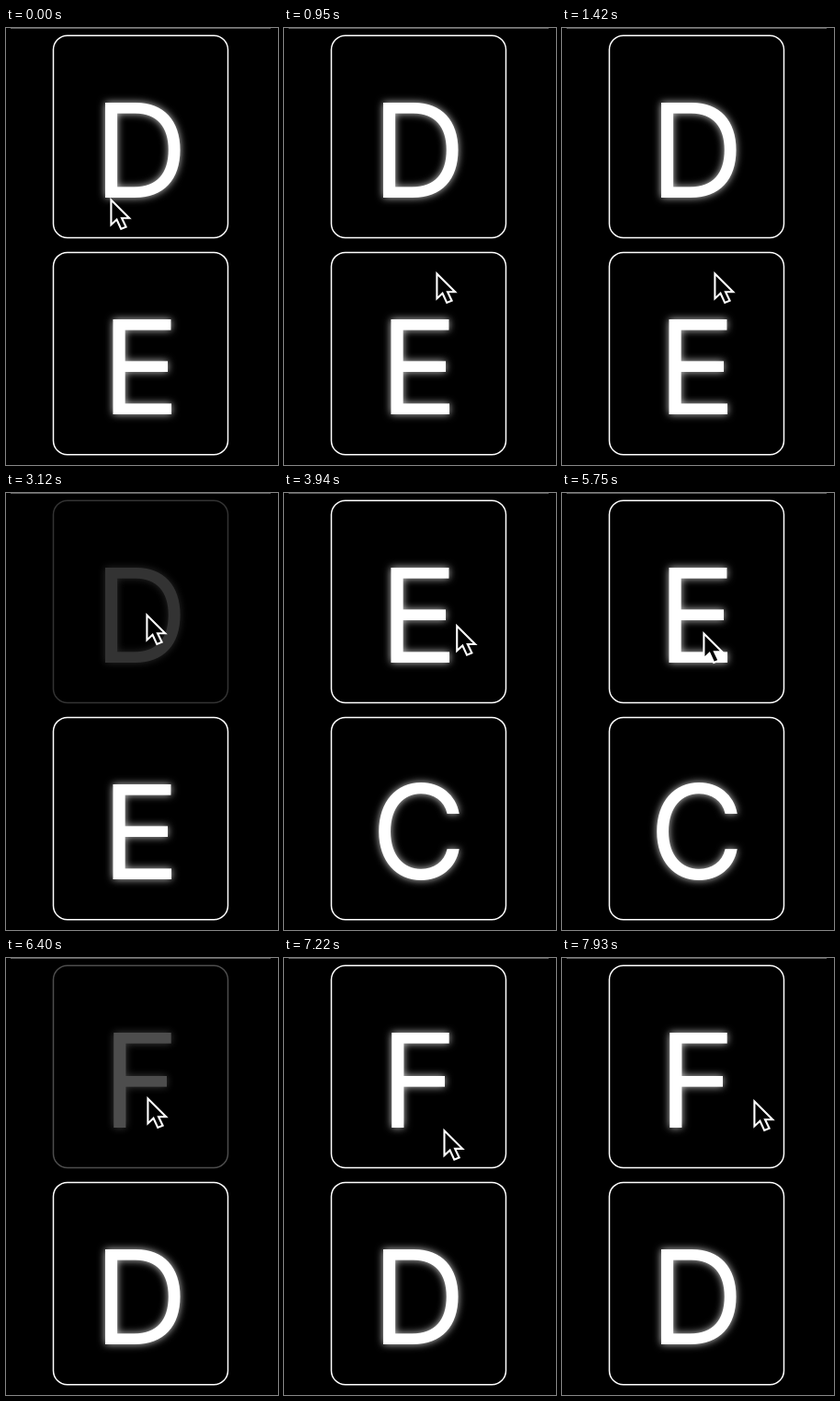
An HTML page that plays this animation: 296x474 px, repeating every 8000 ms.

```html
<!DOCTYPE html>
<html lang="en">
<head>
<meta charset="utf-8">
<style>
  html, body { margin: 0; height: 100%; overflow: hidden; background: #000; }
  svg { display: block; width: 296px; height: 474px; }
  rect { fill: none; stroke: #fff; stroke-width: 1.5; }
  text {
    font: 400 142px Inter, Roboto, sans-serif;
    fill: #fff;
    text-anchor: middle;
    filter: drop-shadow(0 0 4px #fffc);
  }
</style>
</head>
<body>
<svg viewBox="0 0 296 474">
  <path d="M5 .5H288" stroke="#555"/>
  <g class="card">
    <rect x="51.5" y="8.2" width="190" height="219.3" rx="15.3"/>
    <text x="146.7" y="184">D</text>
  </g>
  <g class="card">
    <rect x="51.5" y="243.4" width="190" height="219.3" rx="15.3"/>
    <text x="146.7" y="419">E</text>
  </g>
  <path id="cursor" d="M1.4 2.6V29.4L7.5 23.8L12.2 34L17.6 31.8L13 22.2H21.2Z"
    stroke="#fff" stroke-width="2.1"/>
</svg>
<script>
const LOOP = 8000;
const cards = [...document.querySelectorAll('.card')];
const letters = cards.map(card => card.querySelector('text'));
const cursor = document.getElementById('cursor');

// Pointer moves: each is one Bezier curve, taken in equal steps.
const moves = [
  { start: 80, end: 950, steps: 12, curve: [[113, 184], [30, 200], [230, 250], [165, 264]] },
  { start: 2330, end: 2960, steps: 9, curve: [[165, 264], [260, 200], [105, 58], [152, 130]] },
  { start: 3940, end: 4730, steps: 11, curve: [[152, 130], [305, 150], [170, 445], [54, 311]] },
  { start: 4970, end: 5750, steps: 11, curve: [[54, 311], [40, 290], [300, 120], [153, 150]] },
  { start: 7220, end: 7930, steps: 10, curve: [[153, 150], [258, 247], [-50, 560], [208, 153]] },
];

// A tapped card dims at once, then fades back while the next pair appears.
const taps = [
  { start: 1190, end: 1420, steps: 4, card: 1, next: 'DE' },
  { start: 3120, end: 3360, steps: 4, card: 0, next: 'EC' },
  { start: 6250, end: 6560, steps: 5, card: 0, next: 'FD' },
];

// The small tolerance absorbs uneven step lengths.
function stepAt(t, { start, end, steps }) {
  if (t < start) return 0;
  if (t >= end) return steps;
  return 1 + Math.floor((t - start) / (end - start) * (steps - 1) + .05);
}

const mix = (a, b, u) => a.map((v, i) => v + (b[i] - v) * u);

function pointAt(points, u) {
  while (points.length > 1) {
    points = points.slice(1).map((p, i) => mix(points[i], p, u));
  }
  return points[0];
}

const easeInOut = x => x < .5 ? 2 * x * x : 1 - 2 * (1 - x) ** 2;

function draw(t) {
  const move = moves.findLast(m => t >= m.start) || moves[0];
  cursor.setAttribute('transform',
    `translate(${pointAt(move.curve, stepAt(t, move) / move.steps)})`);

  let pair = 'DE';
  const opacity = [1, 1];
  for (const tap of taps) {
    const step = stepAt(t, tap);
    if (step > 1) pair = tap.next;
    if (step) opacity[tap.card] = .2 + .8 * easeInOut((step - 1) / (tap.steps - 1));
  }
  cards.forEach((card, i) => {
    card.style.opacity = opacity[i];
    letters[i].textContent = pair[i];
  });
}

const begin = performance.now();
function tick() {
  draw((performance.now() - begin) % LOOP);
  requestAnimationFrame(tick);
}
tick();
</script>
</body>
</html>
```
